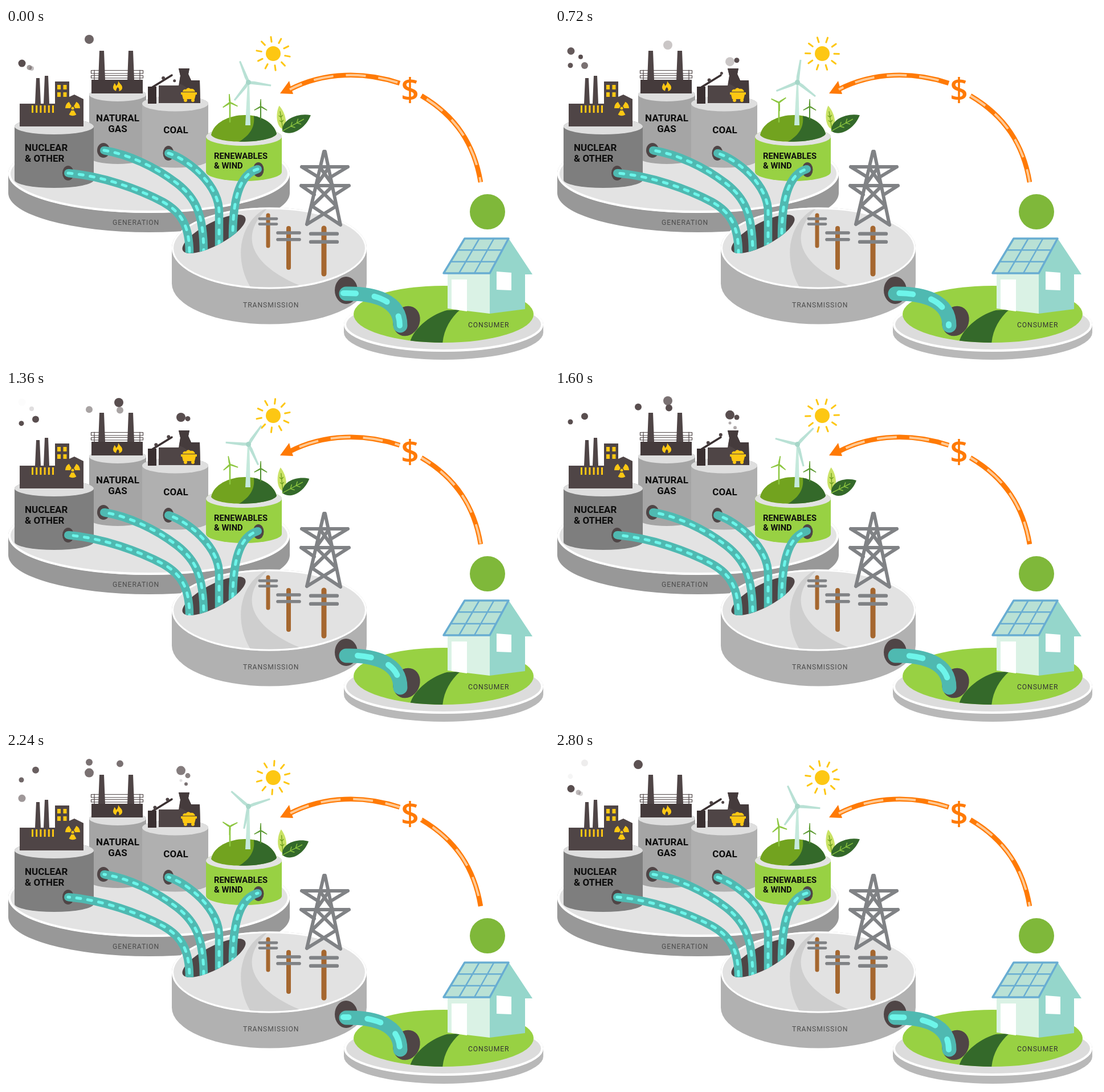
Write an HTML page with a canvas that moves like this. It is 953x587 px and loops after 2.88 s.

```html
<!DOCTYPE html>
<html lang="en">
<head>
<meta charset="utf-8">
<title>Energy flow</title>
<style>
html, body { margin: 0; width: 100%; height: 100%; overflow: hidden; background: #fff; }
canvas { display: block; }
</style>
</head>
<body>
<canvas id="stage" width="953" height="587"></canvas>
<script>
const ctx = document.getElementById('stage').getContext('2d');
const LOOP = 2880, STEP = 80, TAU = Math.PI * 2, RAD = Math.PI / 180;
const DARK = '#4f4546', YELLOW = '#fdc713', ORANGE = '#ff7a05', TEAL = '#4fb9b1',
      GLOW = '#6df5ea', MINT = '#b9e1d5', FOREST = '#34692a', GRASS = '#98d143', STEEL = '#808285';

function shape(d, fill, stroke, width = 1, cap = 'round') {
  const path = new Path2D(d);
  if (fill) { ctx.fillStyle = fill; ctx.fill(path); }
  if (stroke) {
    ctx.strokeStyle = stroke; ctx.lineWidth = width;
    ctx.lineCap = cap; ctx.lineJoin = 'round';
    ctx.stroke(path);
  }
}
function oval(x, y, rx, ry, fill, tilt = 0, stroke, width) {
  ctx.beginPath();
  ctx.ellipse(x, y, rx, ry, tilt * RAD, 0, TAU);
  ctx.fillStyle = fill; ctx.fill();
  if (stroke) { ctx.strokeStyle = stroke; ctx.lineWidth = width; ctx.stroke(); }
}
const disc = (x, y, r, fill) => oval(x, y, r, r, fill);
function box(x, y, w, h, fill) { ctx.fillStyle = fill; ctx.fillRect(x, y, w, h); }
function at(x, y, angle, draw) {
  ctx.save(); ctx.translate(x, y); ctx.rotate(angle * RAD); draw(); ctx.restore();
}
function clipped(path, draw) {
  ctx.save(); ctx.clip(path); draw(); ctx.restore();
}
function ellipsePath(x, y, rx, ry, tilt = 0) {
  const path = new Path2D();
  path.ellipse(x, y, rx, ry, tilt * RAD, 0, TAU);
  return path;
}
function text(s, x, y, size, fill, weight = 700, align = 'left', spacing = 0) {
  ctx.font = `${weight} ${size}px Roboto, "Open Sans", sans-serif`;
  ctx.letterSpacing = spacing + 'px';
  ctx.textAlign = align; ctx.fillStyle = fill;
  ctx.fillText(s, x, y);
}
function drum(x, y, rx, ry, depth, side, top, rim, rimWidth) {
  ctx.beginPath();
  ctx.ellipse(x, y + depth, rx, ry, 0, 0, Math.PI);
  ctx.ellipse(x, y, rx, ry, 0, Math.PI, TAU);
  ctx.fillStyle = side; ctx.fill();
  oval(x, y, rx, ry, top);
  if (rim) oval(x, y, rx - rimWidth / 2, ry - rimWidth / 2, top, 0, rim, rimWidth);
}
function dashes(d, color, width, on, off, shift, cap = 'round') {
  ctx.setLineDash([on, off]);
  ctx.lineDashOffset = -shift;
  shape(d, null, color, width, cap);
  ctx.setLineDash([]);
}

function nuclearPlant() {
  drum(84.5, 173, 69.5, 14, 94, '#7e7e7e', '#dedede');
  shape('M24 133H51L53 88H59L61 133H66L68 84H74L76 133H86V94H111V121L120 117L136 125V173H24Z', DARK);
  for (let i = 0; i < 6; i++) box(45 + i * 7.2, 136, 3, 13, YELLOW);
  for (let i = 0; i < 4; i++) box(90 + (i % 2) * 10.5, 100 + (i >> 1) * 13, 6, 8, YELLOW);
  for (let i = 0; i < 3; i++) {
    const from = (i * 120 + 60) * RAD, to = (i * 120 + 120) * RAD;
    ctx.beginPath();
    ctx.arc(117, 141, 13, from, to);
    ctx.arc(117, 141, 4, to, from, true);
    ctx.fillStyle = YELLOW; ctx.fill();
  }
  disc(117, 141, 2.5, YELLOW);
  text('NUCLEAR', 33, 216, 17, '#0d0d0d');
  text('& OTHER', 33, 235, 17, '#0d0d0d');
}

function gasPlant() {
  drum(196, 117, 50, 12, 110, '#a5a5a5', '#dedede');
  shape('M162 91L164 40H172L174 91ZM213 91L215 40H223L225 91Z', DARK);
  shape('M150 91H240V115H150Z', '#453b3c');
  shape('M149.5 74.5H240.5V80H149.5ZM149.5 83.5H240.5V88H149.5ZM155 74V91M235 74V91', null, DARK, 1.2);
  shape('M197 93C199 98 205 100 204 106C203 110 200 111 196 111C191 111 188 108 188 104C188 101 190 100 190 97C192 98 193 100 193 102C196 100 197 97 197 93Z', YELLOW);
  shape('M196 104Q200 107 198 111H193Q193 107 196 104Z', '#453b3c');
  text('NATURAL', 196, 164, 17, '#0d0d0d', 700, 'center');
  text('GAS', 196, 183, 17, '#0d0d0d', 700, 'center');
}

function coalPlant(time) {
  drum(297, 133, 58, 13.5, 99, '#b0b0b0', '#dedede');
  shape('M268 101H303L306 84L303 71H322L320 81L325 92H340L341 132H268Z', DARK);
  shape('M303 71H322L320 81L325 92H340L341 132H330Q326 104 304 98L306 84Z', '#453b3c');
  box(249, 103, 15, 30, '#3a3031');
  shape('M257 104L291 83', null, '#3a3031', 3.5);
  for (let i = -2; i < 3; i++) {
    const u = (time - 213 - i * 960) / 1440;
    if (u < 0 || u > 1.25) continue;
    if (u < 1) disc(259 + 33 * u, 99 - 21 * u, 3, DARK);
    else disc(292 + (u - 1) * 20, 78 + (u - 1) * 80, 2.5, DARK);
  }
  shape('M307 113H335V117H333L331 125H311L309 117H307ZM310 112Q311 107 316 108Q319 103 324 107Q330 106 332 112Z', YELLOW);
  disc(315, 127, 3, YELLOW);
  disc(328, 127, 3, YELLOW);
  text('COAL', 298, 185, 17, '#0d0d0d', 700, 'center');
}

function turbine(x, y, length, width, angle, color) {
  for (let i = 0; i < 3; i++) at(x, y, angle + i * 120, () =>
    shape(`M0 ${-width * .35}L${length * .25} ${-width / 2}L${length} ${-width * .2}V${width * .3}L0 ${width * .45}Z`, color));
}

function leaf(x, y, angle, length, width, fill, vein) {
  at(x, y, angle, () => {
    shape(`M0 0C${length * .15} ${-width} ${length * .7} ${-width * .8} ${length} 0C${length * .7} ${width * .8} ${length * .15} ${width} 0 0Z`, fill);
    const n = length * .3, b = width * .28;
    shape(`M0 0H${length * .75}M${n} 0L${n + b} ${-b}M${n} 0L${n + b} ${b}M${n * 1.7} 0L${n * 1.7 + b} ${-b}M${n * 1.7} 0L${n * 1.7 + b} ${b}`, null, vein, 1.4);
  });
}

function renewables(p) {
  drum(417.5, 191, 66.5, 16, 62, GRASS, '#e2e2e2');
  clipped(new Path2D('M360 188C364 166 392 153 419 153C447 153 470 166 475 186C466 203 371 205 360 188Z'), () => {
    box(355, 150, 125, 55, '#72a31f');
    shape('M434 150C440 176 424 192 405 202H480V150Z', FOREST);
  });
  shape('M393 131V165', null, '#8cc63f', 2.5);
  shape('M447 139V160', null, '#4f8f2f', 2);
  turbine(393, 131, 15, 3.2, -95 + 240 * p, '#8cc63f');
  turbine(447, 138, 13, 2.6, -90, '#5b9a2f');
  shape('M424 96H427L429 171H420Z', '#c5e9dc');
  turbine(425.5, 95.5, 40, 6, -112.5 + 120 * p, MINT);
  disc(425.5, 95.5, 4.5, '#a6d6c8');

  const swing = Math.min(1, Math.max(0, (p - .36) / .56));
  const sway = Math.sin(swing * Math.PI) ** 2;
  leaf(486, 178, -99 + 9 * sway, 42, 11, '#c9e265', '#6fa01f');
  leaf(485, 181, -29 + 3 * sway, 57 - 10 * sway, 18.5, FOREST, '#8cc63f');
  text('RENEWABLES', 365, 230, 14.8, '#0d0d0d');
  text('& WIND', 365, 247, 14.8, '#0d0d0d');
}

function sun(p) {
  disc(469, 45, 13, YELLOW);
  for (let i = 0; i < 10; i++) at(469, 45, -98 + 36 * (i + 3 * p), () =>
    shape('M21 0H29.5', null, YELLOW, 3));
}

// x, radius, birth, first y, rise per second, life
const puffs = [
  [28, 6.5, 1950, 90, 30, 2300], [52, 6, 320, 75, 22.5, 2550],
  [45, 4, 2700, 76, 28, 1670], [27, 4.5, 240, 71, 11, 2600], [41, 4.5, 2600, 75, 20, 700],
  [146, 8, 1840, 47, 26, 1650], [198, 8, 560, 32, 12.5, 1600],
  [200, 6, 1100, 40, 17, 1700], [146, 6, 1100, 39, 18.5, 1700],
  [307, 8, 560, 62, 17.5, 2200], [319, 4.5, 0, 64, 10, 2730],
  [307, 2.5, 1360, 61, 12.5, 1000], [316, 3, 1360, 70, 15.5, 1440]
];
function smoke(time) {
  for (const [x, r, birth, y, rise, life] of puffs) {
    const age = (time - birth + LOOP) % LOOP;
    if (age > life) continue;
    ctx.globalAlpha = Math.min(1, age / 500, (life - age) / 700);
    disc(x, y - rise * age / 1000, r, '#594e4f');
  }
  ctx.globalAlpha = 1;
}

function transmission() {
  drum(462, 387, 171, 71.5, 62, '#b1b1b1', '#e2e2e2', '#fff', 3);
  clipped(ellipsePath(462, 387, 168, 68.5), () =>
    shape('M461 315C412 335 395 405 433 462H545C480 445 382 388 461 315Z', '#cecece'));
  oval(365, 362, 62, 20, DARK, -28);
  shape('M558 217L528 345M560 217L587 346M519 244H600M518 277H602M519 244L548 262M600 244L570 262M518 277L541 293M602 277L577 293M552 246L574 277M566 246L544 277L580 313L528 345M574 277L537 313L587 346', null, STEEL, 6);
  for (const [x, top, bottom, w, half] of [[460, 329, 383, 7, 15], [496, 352, 421, 8, 19], [558, 352, 432, 9, 23]]) {
    const upper = top + half * .42, lower = upper + half * .62;
    shape(`M${x} ${top}V${bottom}`, null, '#a5672f', w);
    shape(`M${x - half} ${upper}H${x + half}M${x - half} ${lower}H${x + half}`, null, STEEL, w * .7);
  }
  text('TRANSMISSION', 416, 491, 12.2, '#4d4d4d', 400, 'left', .9);
}

const pipes = [
  'M109 255C170 260 235 284 276 306C308 324 322 348 322 396',
  'M172 215C215 222 262 244 300 273C332 298 347 325 347 396',
  'M285 220C318 230 375 275 374 325V390',
  'M442 248C412 256 397 295 398 375'
];
function thinPipes(p) {
  oval(109, 255, 10, 13, DARK);
  oval(171, 215, 11, 13, DARK);
  oval(285, 220, 9.5, 13, DARK);
  oval(443, 249, 9.5, 13, DARK);
  // pipes vanish behind the lower lip of the opening
  const visible = ellipsePath(365, 362, 62, 20, -28);
  visible.addPath(new Path2D('M0 0H500V300L420 333L310 391H0Z'));
  clipped(visible, () => {
    for (const d of pipes) {
      const [x, y] = d.slice(1).split('C')[0].split(' ').map(Number);
      disc(x, y, 7, TEAL);
      shape(d, null, TEAL, 14.5, 'butt');
      dashes(d, GLOW, 5, 7, 12.5, 19.5 * p);
    }
  });
}

function consumer() {
  drum(768, 521, 175, 48, 14, '#b8b8b8', '#dcdcdc', '#fff', 4);
  oval(768, 503, 158, 50, GRASS);
  clipped(ellipsePath(768, 503, 158, 50), () =>
    shape('M774 496C750 502 714 526 708 556H766C768 530 780 510 797 495Z', FOREST));
  shape('M883 371L924 433H911V494L849 502V432Z', '#95d6cb');
  shape('M775 432H849V502L775 493Z', '#daf2e5');
  shape('M782 442H809V498L782 494Z', '#fff');
  shape('M861 428L887 430V461L861 460Z', '#fff');
  shape('M805 370H882L849 431H768Z', MINT, '#68add2', 3.5);
  for (let i = 1; i < 3; i++) {
    const u = i / 3;
    shape(`M${805 + 77 * u} 370L${768 + 81 * u} 431M${805 - 37 * u} ${370 + 61 * u}L${882 - 33 * u} ${370 + 61 * u}`, null, '#68add2', 2.5);
  }
  text('CONSUMER', 811, 526, 12.2, '#333', 400, 'left', .9);
  disc(845, 323, 31, '#7fb83a');
}

function thickPipe(p) {
  oval(597, 461, 20, 24, DARK);
  oval(703, 515, 23, 27, DARK, 25);
  shape('M597 467C645 466 692 478 692 523', null, TEAL, 25);
  dashes('M592 466C645 465 691 478 691 523', GLOW, 10, 24, 33, 57 * p - 2);
}

function moneyArrow(p) {
  const rise = 'M833 271C822 205 790 155 729 119', fall = 'M691 97C630 77 560 76 498 108';
  shape(rise, null, ORANGE, 8.5, 'butt');
  shape(fall, null, ORANGE, 8.5, 'butt');
  shape('M481 115L497 93L500 104L504 116Z', ORANGE);
  dashes(rise, '#ffc993', 4, 35, 22, 31 + 57 * p, 'butt');
  dashes(fall, '#ffc993', 4, 35, 22, 4 + 57 * p, 'butt');
  ctx.font = '600 56px "Open Sans", "Noto Sans", sans-serif';
  ctx.textAlign = 'center';
  ctx.letterSpacing = '0px';
  ctx.fillStyle = ORANGE;
  ctx.fillText('$', 709, 128);
}

function render() {
  const time = Math.floor(performance.now() % LOOP / STEP) * STEP;
  const p = time / LOOP;
  box(0, 0, 953, 587, '#fff');
  drum(251, 256, 247, 69, 34, '#989898', '#e3e3e3', '#fff', 4);
  text('GENERATION', 187, 346, 12.2, '#4d4d4d', 400, 'left', .9);
  gasPlant();
  coalPlant(time);
  nuclearPlant();
  sun(p);
  renewables(p);
  smoke(time);
  transmission();
  thinPipes(p);
  consumer();
  thickPipe(p);
  moneyArrow(p);
  requestAnimationFrame(render);
}
render();
</script>
</body>
</html>
```
